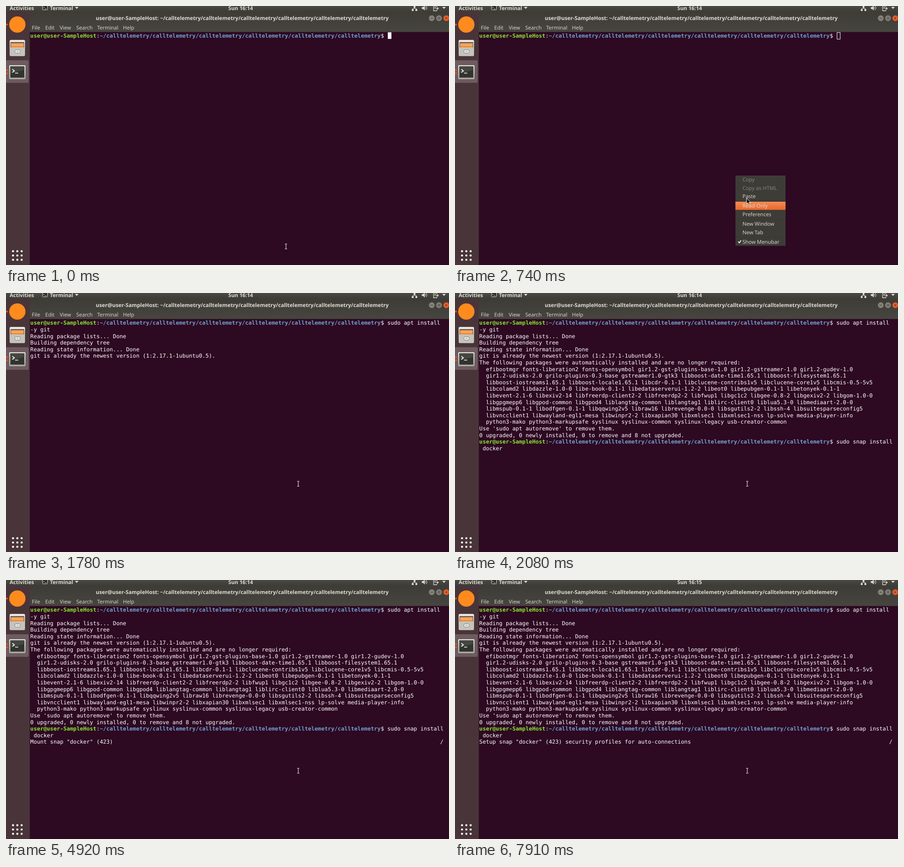
Write an HTML page that moves like this. It is 977 px wide and 573 px high and loops after 8 s.

```html
<!DOCTYPE html>
<html lang="en">
<head>
<meta charset="utf-8">
<title>Terminal</title>
<style>
html, body { margin: 0; width: 100%; height: 100%; overflow: hidden; background: #2d0922; }
svg { display: block; }
text { font: 11.5px "Open Sans", "Noto Sans", sans-serif; fill: #dfdbd2; text-rendering: geometricPrecision; white-space: pre; }
.bold { font-weight: 700; font-size: 11.6px; }
.title { font-size: 11.7px; }
#rows text { font: 12.125px "DejaVu Sans Mono", monospace; fill: #fff; }
#rows .host { font-weight: 700; fill: #8ae234; }
#rows .path { font-weight: 700; fill: #729fcf; }
#rows .inv { fill: #2d0922; }
#menu .off { fill: #8a8780; }
</style>
</head>
<body>
<svg width="977" height="573" viewBox="0 0 977 573">
  <defs>
    <linearGradient id="panel" x2="0" y2="1"><stop stop-color="#4a4943"/><stop offset="1" stop-color="#3d3c37"/></linearGradient>
    <linearGradient id="bar" x2="0" y2="1"><stop stop-color="#3d3c37"/><stop offset="1" stop-color="#46453f"/></linearGradient>
    <linearGradient id="hot" x2="0" y2="1"><stop stop-color="#f68b56"/><stop offset="1" stop-color="#e8672a"/></linearGradient>
    <linearGradient id="metal" x2="0" y2="1"><stop stop-color="#e9e8e4"/><stop offset="1" stop-color="#a9a8a3"/></linearGradient>
  </defs>

  <rect width="977" height="573" fill="#2d0922"/>

  <!-- window frame -->
  <rect x="52" y="13" width="925" height="44.500" fill="url(#bar)"/>
  <text class="bold title" id="title" x="844" y="31" text-anchor="end"></text>
  <g stroke="#55534c" fill="#85837b">
    <circle cx="939" cy="27" r="6.500"/><circle cx="955" cy="27" r="6.500"/>
    <circle cx="971" cy="27" r="6.500" fill="#ee5a24"/>
  </g>
  <path d="M936 27h6M953 25h4v4h-4zM969 25l4 4m0-4l-4 4" fill="none" stroke="#3a3934"/>
  <g id="bar-items"></g>

  <!-- dock -->
  <rect width="52.500" height="573" fill="#493539"/>
  <rect x="-3" y="120" width="53" height="50" rx="3" fill="#6d5b60"/>
  <circle cx="25" cy="41" r="18" fill="#ff8a1e"/>
  <g fill="#e95420">
    <circle cx="2" cy="41" r="2"/><circle cx="2" cy="142" r="2"/><circle cx="2" cy="149" r="2"/>
  </g>
  <rect x="8" y="75" width="34" height="36" rx="3" fill="url(#metal)"/>
  <rect x="10" y="80" width="30" height="12" fill="#55514c"/>
  <path d="M11 82h28v10H11z" fill="#f08a35"/>
  <path d="M11 84.500h28M11 87.500h28" stroke="#ffd9a8"/>
  <rect x="8.500" y="91.500" width="33" height="19" rx="2" fill="#c4c3be"/>
  <rect x="20" y="97" width="11" height="7" rx="1.500" fill="#f4f3ef" stroke="#77756f"/>
  <path d="M23 100.500h5" stroke="#77756f"/>
  <rect x="7" y="131" width="36" height="31" rx="2" fill="url(#metal)"/>
  <rect x="9.500" y="133.500" width="31" height="25" fill="#32332f"/>
  <path d="M9.500 133.500h31v8l-31 8z" fill="#454640"/>
  <path d="M14 140l4.500 3.500-4.500 3.500M20 148.500h7" fill="none" stroke="#fff" stroke-width="1.700"/>
  <g id="apps" fill="#fff"></g>

  <!-- top panel -->
  <rect width="977" height="13" fill="url(#panel)"/>
  <text class="bold" x="8" y="9">Activities</text>
  <rect x="80.500" y="-1" width="11" height="9.500" rx="1" fill="#2e2d29" stroke="#dfdbd2"/>
  <path d="M82.500 2l2 1.500-2 1.500M86 6h3" fill="none" stroke="#dfdbd2"/>
  <text class="bold" x="97" y="9">Terminal</text>
  <path d="M152 2h8l-4 4.500zM962 2h8l-4 4.500z" fill="#dfdbd2"/>
  <text class="bold" id="clock" x="517.500" y="8.500" text-anchor="middle"></text>
  <g fill="#dfdbd2">
    <path d="M899 0h4v4h-4zM895 7h4v4h-4zM903 7h4v4h-4z"/>
    <path d="M917 2.500h3l3.500-3.500v11l-3.500-3.500h-3z"/>
  </g>
  <g fill="none" stroke="#dfdbd2">
    <path d="M901 4v1.500M897 7.500v-2h8v2"/>
    <path d="M925 2q1.500 2.500 0 5M927 0q3 4.500 0 9"/>
    <path d="M950 2.500v-3h-7v11h7v-2M945 2.500h3M945 5h2M948 5.500h5M951 3l2.500 2.500-2.500 2.500" stroke-width="1.300"/>
  </g>

  <rect id="cursor" stroke="#fff"/>
  <g id="rows"></g>
  <g id="menu"></g>
  <path id="arrow" d="M0 0v13l3-2.700 2 4.700 2.300-1-2-4.500h4z" fill="#111" stroke="#fff"/>
  <path id="beam" d="M-2.500-5.500h2l.5.500.500-.5h2M-2.500 5.500h2l.5-.5.500.500h2M0-5v10" fill="none" stroke="#fff"/>
</svg>

<script>
const LOOP = 8000, COL = 7.3, LINE = 14.6, LEFT = 53.6, TOP = 58.2, BASE = 70.4;
const $ = id => document.getElementById(id);
const path = '~' + '/calltelemetry'.repeat(6);
const host = 'user@user-SampleHost';
const prompt = `<tspan class="host">${host}</tspan>:<tspan class="path">${path}</tspan>$ `;

const log = `${prompt}sudo apt install
-y git
Reading package lists... Done
Building dependency tree
Reading state information... Done
git is already the newest version (1:2.17.1-1ubuntu0.5).
The following packages were automatically installed and are no longer required:
  efibootmgr fonts-liberation2 fonts-opensymbol gir1.2-gst-plugins-base-1.0 gir1.2-gstreamer-1.0 gir1.2-gudev-1.0
  gir1.2-udisks-2.0 grilo-plugins-0.3-base gstreamer1.0-gtk3 libboost-date-time1.65.1 libboost-filesystem1.65.1
  libboost-iostreams1.65.1 libboost-locale1.65.1 libcdr-0.1-1 libclucene-contribs1v5 libclucene-core1v5 libcmis-0.5-5v5
  libcolamd2 libdazzle-1.0-0 libe-book-0.1-1 libedataserverui-1.2-2 libeot0 libepubgen-0.1-1 libetonyek-0.1-1
  libevent-2.1-6 libexiv2-14 libfreerdp-client2-2 libfreerdp2-2 libfwup1 libgc1c2 libgee-0.8-2 libgexiv2-2 libgom-1.0-0
  libgpgmepp6 libgpod-common libgpod4 liblangtag-common liblangtag1 liblirc-client0 liblua5.3-0 libmediaart-2.0-0
  libmspub-0.1-1 libodfgen-0.1-1 libqqwing2v5 libraw16 librevenge-0.0-0 libsgutils2-2 libssh-4 libsuitesparseconfig5
  libvncclient1 libwayland-egl1-mesa libwinpr2-2 libxapian30 libxmlsec1 libxmlsec1-nss lp-solve media-player-info
  python3-mako python3-markupsafe syslinux syslinux-common syslinux-legacy usb-creator-common
Use 'sudo apt autoremove' to remove them.
0 upgraded, 0 newly installed, 0 to remove and 8 not upgraded.
${prompt}sudo snap install
 docker`.split('\n');

// Stages of the snap install: start, message, spinner end
const stages = [
  [3580, 'Fetch and check assertions for snap "docker" (423)', 4620],
  [4920, 'Mount snap "docker" (423)', 5660],
  [5810, 'Setup snap "docker" (423) security profiles', 7010],
  [7910, 'Setup snap "docker" (423) security profiles for auto-connections', 7910],
];

// Pointer steps while the menu is open: start, x, y, highlighted item
const moves = [
  [140, 618, 531, -1], [290, 624, 515, 7], [440, 632, 488, 5], [590, 639, 455, 4],
  [740, 643, 425, 3], [890, 644, 421, 2], [1030, 645, 421, 2],
];
const items = [['Copy', 384], ['Copy as HTML', 403], ['Paste', 421], ['Read-Only', 442],
  ['Preferences', 461], ['New Window', 482], ['New Tab', 501], ['Show Menubar', 522]];

const last = (list, t) => list.filter(s => s[0] <= t).pop();
const show = (el, on) => el.setAttribute('visibility', on ? 'visible' : 'hidden');
const place = (el, x, y) => el.setAttribute('transform', `translate(${x} ${y})`);
const invert = s => `<tspan class="inv">${s[0]}</tspan>${s.slice(1)}`;

function screen(t) {
  if (t < 1330) return [prompt];
  if (t < 1630) return [...log.slice(0, 3), invert('Building dependency tree... 50%')];
  if (t < 1780) return [...log.slice(0, 4), invert('Reading state information... 0%')];
  if (t < 2080) return log.slice(0, 6);
  const stage = last(stages, t);
  if (!stage) return log;
  const [start, message, end] = stage;
  const tick = Math.floor((Math.min(t, end) - start + 10) / 150);
  return [...log, message.padEnd(124) + '/-\\|'[tick % 4]];
}

// Cursor cell as [column, row], or nothing while it is hidden
function cursorCell(t) {
  if (t < 1330) return [108, 0];
  if (t < 1630) return [0, 3];
  if (t < 1780) return [0, 4];
  if (t >= 2380 && t < 2980) return [0, 20];
}

function drawMenu(hot) {
  const labels = items.map(([label, y], i) =>
    (i === hot ? `<rect x="618.5" y="${y - 9}" width="110.500" height="18" fill="url(#hot)"/>` : '') +
    `<text x="634" y="${y + 4}" class="${i < 2 ? 'off' : ''}">${label}</text>`).join('');
  $('menu').innerHTML = `<rect x="618.500" y="375" width="110.500" height="155.500" fill="#3d3c37"/>
    <path d="M619 431.500h110M619 471.500h110M619 511.500h110" stroke="#383732"/>${labels}
    <path d="M624.500 521l2.500 3 4-5.500" fill="none" stroke="#fff" stroke-width="1.800"/>`;
}

function drawCursor(cell, hollow) {
  const cursor = $('cursor'), inset = hollow ? 0.5 : 0;
  show(cursor, cell);
  if (!cell) return;
  const box = {
    x: LEFT + cell[0] * COL + inset, y: TOP + cell[1] * LINE + inset,
    width: 8 - 2 * inset, height: LINE,
    fill: hollow ? 'none' : '#fff', 'stroke-width': 2 * inset,
  };
  for (const key in box) cursor.setAttribute(key, box[key]);
}

let shown = '', shownHot;
function draw(t) {
  const text = screen(t).map((s, i) =>
    `<text xml:space="preserve" x="${LEFT}" y="${BASE + i * LINE}">${s}</text>`).join('');
  if (text !== shown) $('rows').innerHTML = shown = text;

  const open = t >= 140 && t < 1330;
  drawCursor(cursorCell(t), open);
  show($('menu'), open);
  show($('arrow'), open);
  show($('beam'), !open);
  if (open) {
    const [, x, y, hot] = last(moves, t);
    place($('arrow'), x, y);
    if (hot !== shownHot) drawMenu(shownHot = hot);
  } else if (t < 140) place($('beam'), 617.5, 532);
  else place($('beam'), 644.5, 422);

  $('clock').textContent = t < 5220 ? 'Sun 16:14' : 'Sun 16:15';
}

$('title').textContent = `${host}: ${path}`;
$('bar-items').innerHTML = [['File', 57], ['Edit', 86.5], ['View', 118.5], ['Search', 155], ['Terminal', 201], ['Help', 258]]
  .map(([s, x]) => `<text x="${x}" y="52.200">${s}</text>`).join('');
$('apps').innerHTML = [...Array(9).keys()]
  .map(i => `<circle cx="${15.5 + i % 3 * 9.5}" cy="${542.5 + Math.floor(i / 3) * 9.5}" r="2.300"/>`).join('');

const begin = performance.now();
function frame() {
  draw((performance.now() - begin) % LOOP);
  requestAnimationFrame(frame);
}
frame();
</script>
</body>
</html>
```
